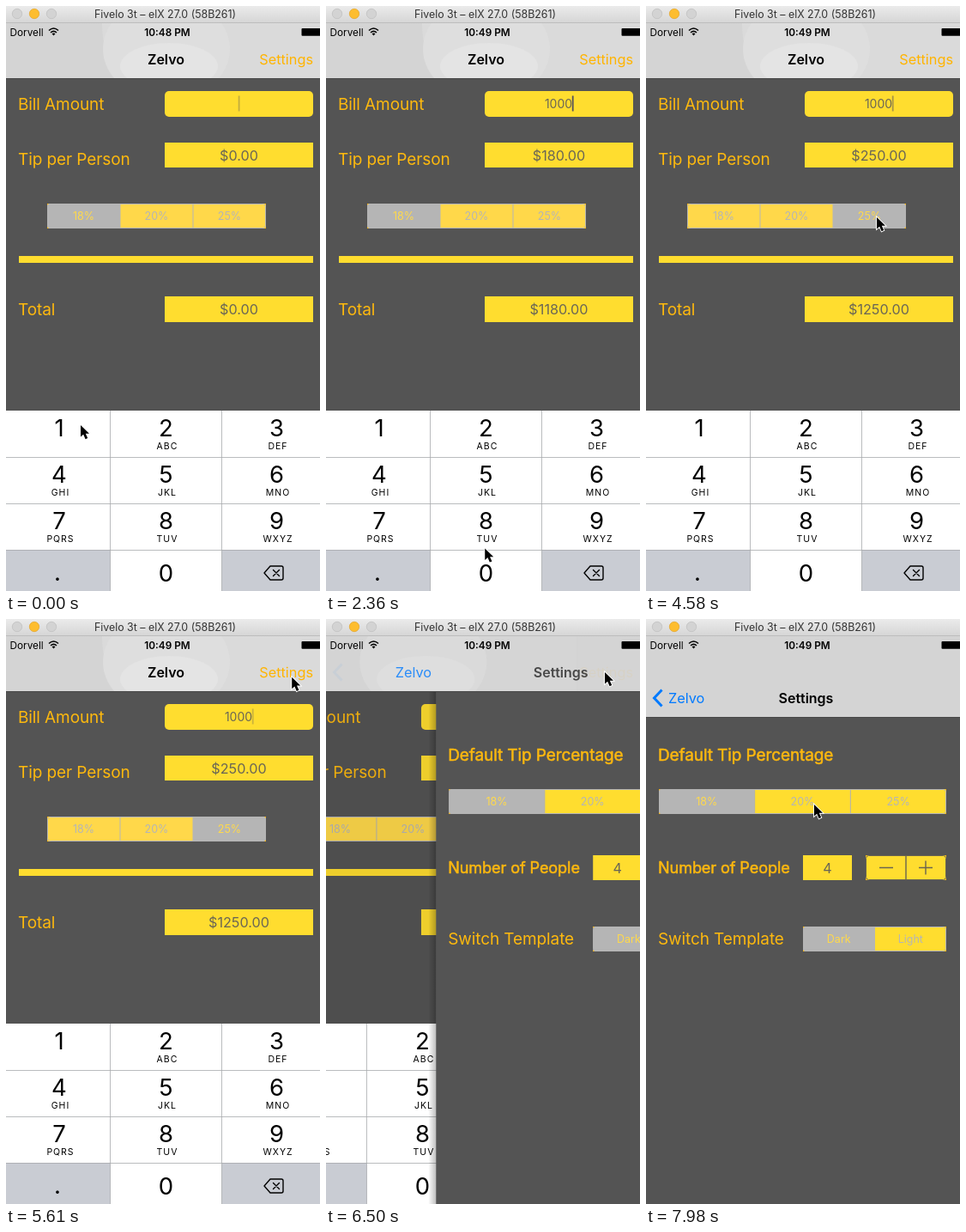
An HTML page that plays this animation: 366 by 681 pixels, repeating every 8 s.

```html
<!DOCTYPE html>
<html lang="en">
<head>
<meta charset="utf-8">
<title>Tip calculator</title>
<style>
html, body { margin: 0; width: 100%; height: 100%; overflow: hidden; background: #545454; }
svg { display: block; width: 366px; height: 681px; }
text { font-family: Inter, "Open Sans", sans-serif; white-space: pre; }
.label { font-size: 19px; letter-spacing: -.1px; fill: #feb90e; }
.bold { stroke: #feb90e; stroke-width: .5px; }
.value { font-size: 16.2px; fill: #6a6655; text-anchor: middle; }
.bill { font-size: 14px; }
.seg { font-size: 12.5px; text-anchor: middle; }
.nav { font-size: 16.3px; }
.title { font-size: 16px; font-weight: 600; text-anchor: middle; }
.digit { font-size: 27.5px; text-anchor: middle; }
.letters { font-size: 10.5px; letter-spacing: 1px; text-anchor: middle; }
.status { font-size: 11.8px; }
</style>
</head>
<body>
<svg id="stage" viewBox="0 0 366 681"></svg>
<script>
const YELLOW = '#ffdd2f', ORANGE = '#feb90e', GREY = '#b5b5b5', DARK = '#545454', KEY = '#c9ccd3';
const LOOP = 8000, WIDTH = 375;

const rect = (x, y, w, h, fill, more = '') =>
  `<rect x="${x}" y="${y}" width="${w}" height="${h}" fill="${fill}" ${more}/>`;
const text = (x, y, cls, str, more = '') =>
  `<text x="${x}" y="${y}" class="${cls}" ${more}>${str}</text>`;

// A bordered box whose square corners show behind the rounded outline.
const border = (x, y, w, color) =>
  [x, x + w - 1.5].map(cx => [y, y + 27.5].map(cy => rect(cx, cy, 1.5, 1.5, ORANGE)).join('')).join('') +
  rect(x + .5, y + .5, w - 1, 28, 'none', `rx="3" stroke="${color}"`);

function segments(id, x, y, w, names) {
  const step = w / names.length;
  const cells = names.map((name, i) =>
    rect(x + i * step, y, step, 29, YELLOW, 'class="cell"') +
    text(x + (i + .5) * step, y + 19, 'seg', name)).join('');
  const lines = names.slice(1).map((_, i) => `M${x + (i + 1) * step} ${y}v29`).join('');
  return `<g id="${id}">${cells}<path d="${lines}" stroke="${GREY}"/>${border(x, y, w, GREY)}</g>`;
}

function selectSegment(id, chosen, idle) {
  const g = document.getElementById(id);
  g.querySelectorAll('.cell').forEach((c, i) => c.setAttribute('fill', i === chosen ? GREY : idle));
  g.querySelectorAll('text').forEach((c, i) => c.setAttribute('fill', i === chosen ? '#ffd94b' : GREY));
}

function keypad() {
  const letters = ['', 'ABC', 'DEF', 'GHI', 'JKL', 'MNO', 'PQRS', 'TUV', 'WXYZ'];
  const mid = [62, 186.5, 315.5];
  let out = rect(0, 471, WIDTH, 210, '#fff') +
    rect(0, 471, 121.5, 54, KEY, 'id="key1"') +
    rect(121.5, 633, 130, 48, KEY, 'id="key0"') +
    rect(0, 633, 121.5, 48, KEY) + rect(251.5, 633, 124, 48, KEY);
  letters.forEach((word, i) => {
    const x = mid[i % 3], y = 500.5 + 54 * Math.floor(i / 3);
    out += text(x, y, 'digit', i + 1) + text(x + 1.5, y + 15.5, 'letters', word);
  });
  return out + text(186.5, 670, 'digit', 0) + text(60, 669, 'digit', '.') +
    '<path d="M0 525.5H375M0 579.5H375M0 633.5H375M121.5 471V681M251.5 471V681" stroke="#a9abae" stroke-width=".8"/>' +
    `<g fill="none" stroke="#000" stroke-width="1.4" stroke-linejoin="round" stroke-linecap="round">
      <path d="M308 652H321Q323 652 323 654V666Q323 668 321 668H308L301 660Z"/>
      <path d="M311.5 656.5l7 7m0-7l-7 7"/></g>`;
}

const mainScreen = rect(0, 84, WIDTH, 597, DARK) +
  text(14, 121, 'label', 'Bill Amount') +
  text(14, 185, 'label', 'Tip per Person') +
  text(14, 360, 'label', 'Total') +
  rect(185, 99, 173, 30, YELLOW, 'rx="5"') +
  rect(185, 159, 173, 29, YELLOW) +
  rect(185, 338, 173, 30, YELLOW) +
  rect(15, 291, 343, 8, YELLOW) +
  text(271, 119, 'value bill', '', 'id="bill"') +
  text(271.5, 179.5, 'value', '', 'id="tip"') +
  text(271.5, 359, 'value', '', 'id="total"') +
  rect(0, 104.5, 1.8, 18, '#56525c', 'id="caret"') +
  segments('rates', 48, 230, 255, ['18%', '20%', '25%']) +
  rect(0, 84, WIDTH, 387, '#000', 'id="dim"') + keypad();

const settingsScreen = rect(-9, 84, 9, 597, 'url(#shade)') +
  rect(0, 84, WIDTH, 597, DARK) +
  text(14, 165, 'label bold', 'Default Tip Percentage') +
  text(14, 296, 'label bold', 'Number of People', 'style="font-size:18.1px"') +
  text(14, 379, 'label', 'Switch Template') +
  segments('defaults', 15, 198, 335, ['18%', '20%', '25%']) +
  segments('theme', 183, 358, 167, ['Dark', 'Light']) +
  rect(183, 275, 57, 29, YELLOW) + text(211.5, 295.5, 'value', '4') +
  rect(256, 275, 94, 29, YELLOW) + border(256, 275, 94, '#6a6450') +
  '<path d="M303 275V304M272 289.5h16M318 289.5h16M326 281.5v16" stroke="#6a6450" stroke-width="1.4"/>';

const navBar = rect(0, 20, 366, 64, '#d4d4d4', 'id="bar"') +
  `<g id="glow" clip-path="url(#barClip)">
    <path id="sheen" d="M112 20Q112 84 165 84H366V20Z" fill="#dadada"/>
    <ellipse cx="187" cy="50" rx="74" ry="60" fill="#dedede"/>
    <ellipse cx="190" cy="70" rx="57" ry="27" fill="#e4e4e4"/></g>` +
  rect(0, 84, 366, 1, '#484848', 'id="edge"') +
  text(186.5, 68, 'title', 'Zelvo', 'id="home"') +
  text(358, 68, 'nav', 'Settings', 'id="open" fill="#ffb400" text-anchor="end"') +
  `<g id="navItems">
    <path id="chevron" d="M18.5 -15.5L9.5 -6L18.5 3.5" fill="none" stroke="#007aff" stroke-width="3"/>
    ${text(26, 0, 'nav', 'Zelvo', 'id="back" fill="#007aff"')}
    ${text(186.5, 0, 'title', 'Settings', 'id="heading"')}</g>`;

const light = (x, fill, line) =>
  `<circle cx="${x}" cy="9" r="5.7" fill="${fill}" stroke="${line}" stroke-width=".7"/>`;
const chrome = text(4.5, 34.5, 'status', 'Dorvell') +
  `<path d="M50 28.5Q55.5 23.5 61 28.5M52 31Q55.5 27.8 59 31" fill="none" stroke="#000" stroke-width="1.6"/>
    <path d="M53.5 32.3Q55.5 30.8 57.5 32.3L55.5 34.5Z"/>` +
  text(188, 34.5, 'status', '', 'id="clock" font-weight="600" text-anchor="middle"') +
  rect(344.5, 26, 24, 8.7, '#000', 'rx="1"') +
  rect(0, 0, 366, 20, 'url(#frame)') + rect(0, 19.3, 366, .7, '#b4b4b4') +
  light(13, '#d3d3d3', '#bebebe') + light(33, '#fdbd2f', '#e3a428') + light(53, '#d3d3d3', '#bebebe') +
  text(185.5, 14, '', 'Fivelo 3t – elX 27.0 (58B261)', 'font-size="12.4" fill="#333" text-anchor="middle"');

document.getElementById('stage').innerHTML = `<defs>
  <linearGradient id="frame" x2="0" y2="1"><stop stop-color="#ebebeb"/><stop offset="1" stop-color="#d5d5d5"/></linearGradient>
  <linearGradient id="shade"><stop stop-opacity="0"/><stop offset="1" stop-opacity=".25"/></linearGradient>
  <clipPath id="barClip"><rect x="0" y="20" width="500" height="64"/></clipPath></defs>
  <g id="main">${mainScreen}</g><g id="settings">${settingsScreen}</g>${navBar}${chrome}
  <path id="pointer" d="M0 0V13.5L3.2 10.7L5.6 16.2L8.2 15L5.8 9.8H10Z" stroke="#fff" stroke-width="1.8" paint-order="stroke"/>`;

// Pointer legs: begin, end, and the place reached.
const LEGS = [
  { from: 440, to: 1180, x: 187, y: 660 },
  { from: 2210, to: 3100, x: 162, y: 252 },
  { from: 3540, to: 4430, x: 269, y: 246 },
  { from: 4870, to: 5460, x: 345, y: 76 },
  { from: 5460, to: 5720, x: 325, y: 62 },
  { from: 6900, to: 7260, x: 262, y: 102 },
  { from: 7260, to: 7800, x: 196, y: 216 }
];
const TYPED = [290, 1320, 1770, 2070], CHOSEN = [3240, 4570];
const FOCUS = -540, PRESS = 150, RATES = [.18, .2, .25];

const clamp = v => Math.max(0, Math.min(1, v));
const smooth = u => u * u * (3 - 2 * u);
const passed = (times, t) => times.filter(time => time <= t).length;

const held = t => 137 + 147.8 * Math.floor((t - 137) / 147.8);
const push = t => 1 - Math.pow(1 - clamp((t - 6330) / 540), 3);
const barBottom = t => 84 + 30 * (1 - Math.exp(-Math.max(0, t - 6590) / 152));
const blink = age => clamp(.65 + Math.cos(2 * Math.PI * (age / 1000 - .23)));

function pointerAt(t) {
  let x = 87, y = 488;
  for (const leg of LEGS) {
    const k = smooth(clamp((t - leg.from) / (leg.to - leg.from)));
    x += (leg.x - x) * k;
    y += (leg.y - y) * k;
  }
  return [x, y];
}

const el = {};
document.querySelectorAll('[id]').forEach(node => el[node.id] = node);
const set = (id, name, v) => el[id].setAttribute(name, v);
const move = (id, x, y) => set(id, 'transform', `translate(${x} ${y})`);
const write = (id, str) => { if (el[id].textContent !== str) el[id].textContent = str; };

selectSegment('defaults', 0, YELLOW);
selectSegment('theme', 0, YELLOW);

function drawBill(t, now) {
  const count = passed(TYPED, t), choice = passed(CHOSEN, t);
  const bill = '1000'.slice(0, count), tip = bill * RATES[choice];
  write('bill', bill);
  write('tip', '$' + tip.toFixed(2));
  write('total', '$' + (+bill + tip).toFixed(2));
  write('clock', t < 890 ? '10:48 PM' : '10:49 PM');
  selectSegment('rates', choice, '#ffd84a');
  set('caret', 'x', 270.7 + (bill ? el.bill.getComputedTextLength() / 2 : 0));
  set('caret', 'opacity', blink(now - (count ? TYPED[count - 1] : FOCUS)));

  const pressed = count < 3 && t >= TYPED[count] - PRESS;
  set('key1', 'opacity', +(pressed && count === 0));
  set('key0', 'opacity', +(pressed && count > 0));
}

function drawPush(now) {
  const p = push(now), bar = barBottom(now);
  move('main', -.3 * WIDTH * p, 0);
  move('settings', WIDTH * (1 - p), 0);
  set('settings', 'visibility', p ? 'visible' : 'hidden');
  set('dim', 'opacity', .1 * p);

  set('bar', 'height', bar - 20);
  set('edge', 'y', bar);
  move('glow', -112 * p, 0);
  set('glow', 'opacity', Math.pow(1 - p, .4));
  set('sheen', 'opacity', 1 - p);
  move('home', -138 * p, 0);
  set('home', 'opacity', clamp(1 - 2 * p));
  set('open', 'opacity', now < 6190 ? 1 : .3 * clamp(1 - 1.2 * p));
  move('navItems', 0, bar - 16);
  move('back', 160 * (1 - p), 0);
  set('back', 'opacity', Math.sqrt(p));
  move('heading', 255 * (1 - p), 0);
  set('heading', 'opacity', p);
  set('chevron', 'opacity', Math.pow(p, 7));
}

function draw(t) {
  const now = held(t);
  drawBill(t, now);
  drawPush(now);
  move('pointer', ...pointerAt(now));
}

const start = performance.now();
function tick() {
  draw((performance.now() - start) % LOOP);
  requestAnimationFrame(tick);
}
tick();
</script>
</body>
</html>
```
